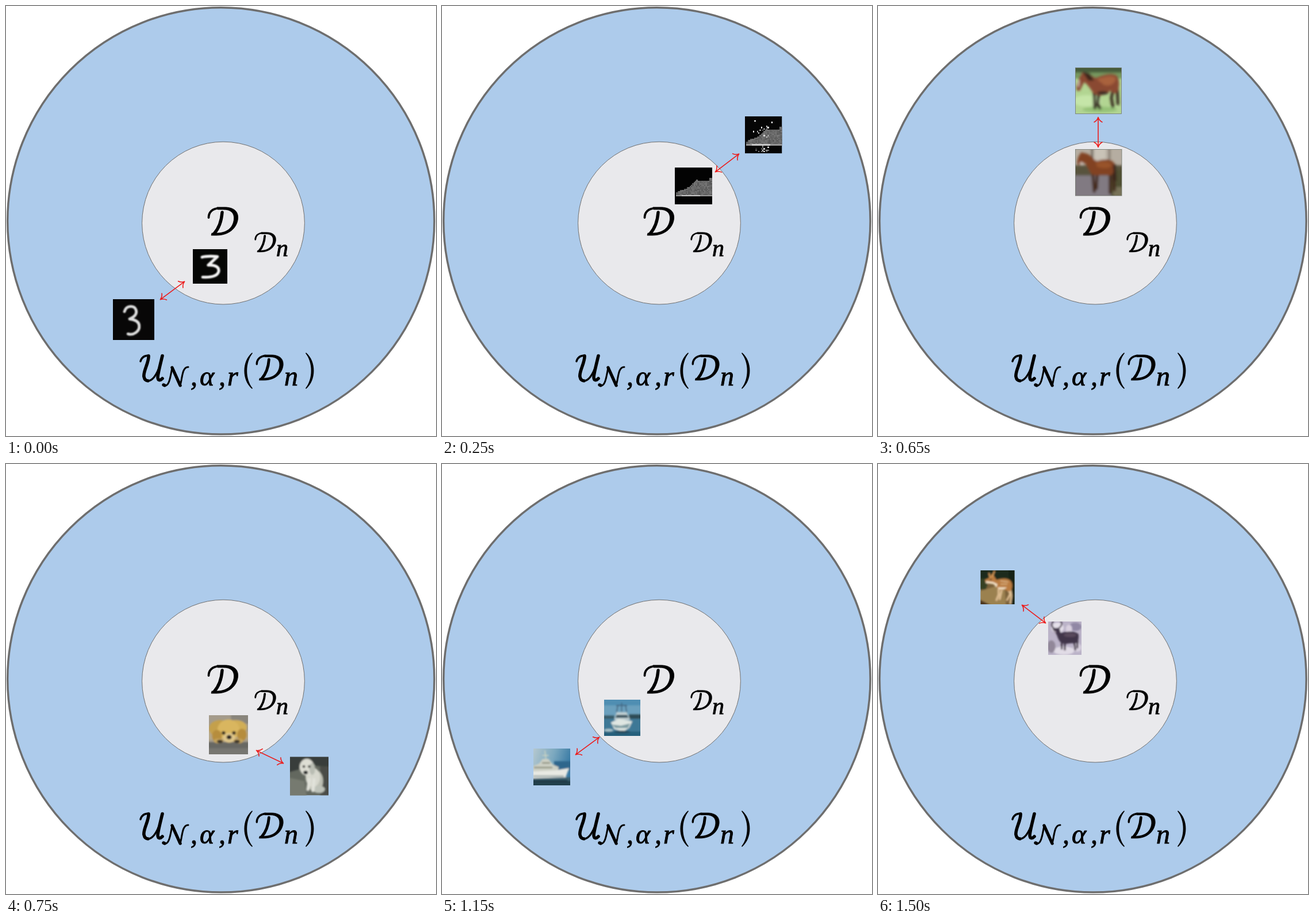
An HTML page that plays this animation: 748 by 748 pixels, repeating every 1750 ms.

```html
<!DOCTYPE html>
<html lang="en">
<head>
<meta charset="utf-8">
<title>Nested neighbourhoods</title>
<style>
  html, body { margin: 0; width: 100%; height: 100%; overflow: hidden; background: #fff; }
  svg { display: block; }
  .ink { fill: none; stroke: #000; stroke-linecap: round; stroke-linejoin: round; }
  text { font: italic 48px "Liberation Serif", "Noto Serif", serif; stroke: #000; stroke-width: .9; }
</style>
</head>
<body>
<svg id="stage" width="748" height="748" viewBox="0 0 748 748">
  <defs>
    <filter id="soft" x="-20%" y="-20%" width="140%" height="140%"><feGaussianBlur stdDeviation=".85"/></filter>
    <filter id="pen" x="-20%" y="-20%" width="140%" height="140%"><feGaussianBlur stdDeviation=".4"/></filter>
    <linearGradient id="sea" x2="1" y2=".3"><stop stop-color="#b5c8cf"/><stop offset=".55" stop-color="#7ba8bf"/><stop offset="1" stop-color="#3a7ba5"/></linearGradient>
    <g id="scriptD">
      <path stroke="#000" stroke-width=".8" d="M17 1H30C48 1 54.5 10 53.5 21C51.5 38 37 50 16 50H7L8 46H16C34 46 45 37 46.5 22C47.5 11 41 5 28 5H18Z"/>
      <path class="ink" stroke-width="3.8" d="M2.5 19C2.5 10 9 3 20 2.8"/>
      <path class="ink" stroke-width="5.4" d="M26 10C25 24 20 38 12 47"/>
    </g>
  </defs>
  <circle cx="373.9" cy="373.9" r="371.2" fill="#adcbeb" stroke="#6e6e6e" stroke-width="3.5"/>
  <circle cx="378" cy="377.6" r="141.4" fill="#e9e9ec" stroke="#707070"/>

  <use href="#scriptD" x="350" y="349"/>
  <use href="#scriptD" transform="translate(432 393) scale(.7)"/>
  <text x="470" y="435" style="font-size:42px">n</text>

  <g class="ink">
    <g transform="translate(232 605)">
      <path stroke-width="3.4" d="M2 13C4 6 9 3 16 3M40 3C38 18 28 47 15 47"/>
      <path stroke-width="5.6" d="M16 3.5C17 15 6 31 8 40C9 45 11 47 15 47M40 3.5C37 16 33 31 32 40C32 47 36 47 40 43"/>
    </g>
    <g transform="translate(272 625)">
      <path stroke-width="3" d="M2 35C12 39 14 20 17 4M31 35C35 22 34 3 45 3"/>
      <path stroke-width="5.4" d="M17 4L31 35M2 34L4 35"/>
    </g>
  </g>
  <text x="321" y="660">,</text>
  <text x="337" y="660">α</text>
  <text x="370" y="660">,</text>
  <text x="385" y="660">r</text>
  <path d="M428 603C410 618 410 651 428 666L429 665C416 649 416 620 429 604Z"/>
  <use href="#scriptD" transform="translate(434 606) scale(.9)"/>
  <text x="484" y="660">n</text>
  <path d="M522 603C540 618 540 651 522 666L521 665C534 649 534 620 521 604Z"/>
  <g id="scenes"></g>
</svg>
<script>
const STEP = 250;

const fill = (color, d) => `<path fill="${color}" d="${d}"/>`;
const line = (color, width, d) =>
  `<path fill="none" stroke="${color}" stroke-width="${width}" stroke-linecap="round" stroke-linejoin="round" d="${d}"/>`;
const oval = (color, x, y, rx, ry = rx) => `<ellipse fill="${color}" cx="${x}" cy="${y}" rx="${rx}" ry="${ry}"/>`;
const box = (color, x, y, w, h) => `<rect fill="${color}" x="${x}" y="${y}" width="${w}" height="${h}"/>`;

function thumb(x, y, w, h, units, back, art, filter = "soft") {
  return `<svg x="${x}" y="${y}" width="${w}" height="${h}" viewBox="0 0 ${units} ${units}" preserveAspectRatio="none">
    ${box(back, 0, 0, units, units)}<g ${filter && `filter="url(#${filter})"`}>${art}</g></svg>`;
}
const photo = (x, y, size, back, ...art) => thumb(x, y, size, size, 32, back, art.join(""));

function arrow(x1, y1, x2, y2) {
  const len = Math.hypot(x2 - x1, y2 - y1);
  const angle = Math.atan2(y2 - y1, x2 - x1) * 180 / Math.PI;
  const head = "M9 -7C7 -3 4 -1 .5 0C4 1 7 3 9 7";
  return `<g transform="translate(${x1} ${y1}) rotate(${angle})">${line("#ec1c1c", 1.6, `M1 0H${len - 1}${head}`)}
    <g transform="translate(${len}) scale(-1 1)">${line("#ec1c1c", 1.6, head)}</g></g>`;
}

function seeded(seed) {
  return () => (seed = seed * 16807 % 2147483647) / 2147483647;
}

// A grey boot built from 28 pixel columns, with optional bright specks.
function boot(noisy) {
  const rand = seeded(77);
  const cell = (x, y, v) => box(`rgb(${v},${v},${v})`, x, y, 1.05, 1.05);
  const top = x => x < 10 ? 19 - x * .4 : x < 17 ? 15 - (x - 10) : x < 26 ? 9.5 : 7.5;
  let art = "";
  for (let x = 1; x < 28; x++) {
    for (let y = Math.round(top(x)); y < 21; y++) art += cell(x, y, 88 + rand() * 32 | 0);
    art += cell(x, 21, x > 4 && x < 19 ? 200 : 150);
  }
  if (noisy) {
    for (let i = 0; i < 20; i++) art += cell(8 + rand() * 10 | 0, 22 + rand() * 5 | 0, 40 + rand() * 190 | 0);
    for (let i = 0; i < 14; i++) art += cell(9 + rand() * 9 | 0, 7 + rand() * 9 | 0, 50 + rand() * 180 | 0);
    for (const [x, y] of [[7, 3], [20, 4], [6, 11], [12, 8], [17, 8]]) art += cell(x, y, 245);
  }
  return `<g shape-rendering="crispEdges">${art}</g>`;
}

const border = (x, y, w) => `<rect x="${x}" y="${y}" width="${w}" height="${w}" fill="none" stroke="#70756c" stroke-width=".8"/>`;

const digits = () =>
  thumb(325, 423, 60, 60, 28, "#050604",
    line("#f5f5f5", 2.3, "M7.5 6.5C11 5.5 15 5.6 20 6L12.5 13C18 12.5 21.5 14.5 21 18C20 22 15 23 8 22.7"), "pen") +
  thumb(186, 510, 72, 71, 28, "#080707",
    line("#dedede", 1.9, "M7.8 8.5C8.5 6 10 5 12 5C16 5 16.5 9 15 11C14 12.5 12.5 13 11.3 13.6C15 14 17.7 15.5 17.8 18.5C18 22 14 25 10.2 23.8"), "pen") +
  arrow(268, 511, 311, 479);

const boots = () =>
  thumb(405, 281, 65, 64, 28, "#030303", boot(false), "") +
  thumb(527, 192, 64.5, 64.5, 28, "#060606", boot(true), "") +
  arrow(475, 289, 517, 257);

const horses = () =>
  photo(343.5, 107.5, 80, "#b2d592",
    box("#465c3b", -2, -2, 36, 5.5), box("#76985e", -2, 3.5, 36, 4), oval("#c5e5a8", 8, 23, 10, 4), oval("#94c177", 17, 29, 12, 2),
    line("#30231f", 2, "M13 18L13.5 28M16 19L15.5 26L17 28"),
    line("#35251f", 2, "M26 16L25 21L26 27M29 14L29.5 25"),
    fill("#8a4930", "M1 16L.5 13L3 6L5 3L9 4L14 7C19 5 25 3 29 5.5C31 9 31 15 28 18L24 16C21 20 14 20 12 17C10 14 8 11 6 10L3 16Z"),
    fill("#a9623e", "M15 8C20 6 26 5 28 7C28 11 24 13 20 12Z"),
    fill("#3d251f", "M5 3L10 4L13 9L9 9Z"), oval("#352820", 19, 17.5, 4, 1.2), line("#e5d5c4", .8, "M2.5 9L2 13")) +
  border(343.5, 107.5, 80) +
  photo(343.5, 249.5, 80.5, "#b5ada1",
    box("#c9c3b7", 13, -2, 8, 11), box("#635c50", 11, -2, 1.2, 14), box("#756c60", 23, -2, 1, 12),
    box("#58523c", -2, 11, 36, 8), box("#817a82", -2, 18, 30, 16), fill("#4f5031", "M24 14H34V34H25Z"), box("#777258", 26, 26, 8, 8),
    line("#45291e", 2, "M12 17L13 29M15 18L14.5 27M24 15L24 30M26 14L27 28"),
    fill("#824323", "M1 9L2 5L4 2L8 3C11 4 12 7 15 8C20 6 26 7 27 10C28 14 26 18 23 18C19 17 14 19 11 17C9 14 8 11 6 9L4 10L2 11Z"),
    fill("#98532a", "M14 9C19 8 24 8 25 11C23 14 18 13 15 12Z"), line("#38231c", 1.8, "M27 11L27.5 21"), oval("#d9c9bd", 4, 9.5, .9)) +
  border(343.5, 249.5, 80.5) +
  arrow(383, 193, 383, 246);

const dogs = () =>
  photo(353, 437, 68, "#a49b8b",
    box("#89857c", 18, -2, 16, 9), box("#b5a789", -2, 13, 36, 7), box("#686764", -2, 22, 36, 12), box("#777671", -2, 27, 36, 7),
    oval("#c4a04c", 9, 11, 9, 7), oval("#d1ae56", 22, 10, 9, 6), oval("#d9b65f", 16, 12, 9, 8.5),
    oval("#b68d3d", 6.5, 17, 4, 5), oval("#b68d3d", 27, 16, 4, 5), oval("#dfc68a", 16.5, 18.5, 5, 4),
    oval("#c5a35c", 8, 21, 4, 2), oval("#c5a35c", 24, 21, 4, 2), oval("#332a20", 12, 14.5, 1.5), oval("#332a20", 20.5, 14.5, 1.5),
    oval("#211e1c", 16.5, 18, 2.1, 1.8), oval("#3b342a", 9, 21.5, 2.4, 1.4), oval("#3b342a", 23, 21.5, 2.4, 1.4)) +
  photo(494, 509.5, 67, "#63685f",
    fill("#383d3b", "M-2 -2H34V9L20 7L-2 13Z"), fill("#767a70", "M-2 17L12 20L14 34H-2Z"), box("#484c46", 25, 8, 9, 24),
    oval("#bdbfb4", 21, 20, 6.5, 9), oval("#d7d8ce", 19, 17, 6, 8), oval("#deded4", 14, 8.5, 6, 7),
    oval("#b9bdb3", 18.5, 10, 2.4, 5), oval("#bec2b9", 24, 27, 5, 3), line("#e1e2da", 2.6, "M16 19L15 27M20 19L19 28"),
    oval("#292c2a", 11.5, 8, 1.1), oval("#3a3d3a", 16, 8, 1.1), oval("#1e2020", 13, 13, 1.9, 1.5)) +
  arrow(435, 498, 483, 521);

const boats = () =>
  photo(282, 410, 63, "#6ba0bd",
    box("#4f8eb2", -2, -2, 36, 7), box("#385a66", -2, 14, 11, 3), box("#2f4c55", 22, 13, 12, 4),
    box("#3c7896", -2, 17, 36, 17), box("#28607c", -2, 28, 36, 6),
    line("#41617b", .8, "M11 5H20M12 5L11 12M19 5L20 12M15.5 3V11"), fill("#c3d2d5", "M11 11H20L23 18H9Z"),
    fill("#35505b", "M11 13.5H20.5L21.5 16H10Z"), fill("#dfe6e2", "M6 20L13 17L25 19L22 25L17 28L9 26Z"),
    fill("#7d9ca2", "M7 22L15 23L23 21L21 25L10 25Z"), oval("#a9c4cb", 4, 27, 4, 1.2), oval("#25495a", 16, 28.5, 7, 1.2)) +
  photo(159, 495, 64, "url(#sea)",
    box("#2f668c", 18, 11, 16, 8), box("#3b6071", -2, 25, 36, 9), box("#213f4b", -2, 28, 36, 6),
    line("#d2d8c4", .8, "M10 2L11 10M8 6H13"), fill("#cdd0c5", "M-2 16L5 13L8 9H13L17 14L22 16L21 21H-2Z"),
    line("#8b8f7e", 1.2, "M1 16.5H16M8 12.5H14"), fill("#e8e9e3", "M-2 20L19 19L31 17L28 25L-2 26Z"),
    line("#9ba8a7", 1.2, "M0 24H26"), line("#1b3843", 1.4, "M-1 28H29")) +
  arrow(232, 506, 274, 475);

const cars = () =>
  photo(405, 274, 64, "#4b534f",
    fill("#34443a", "M-2 -2H34V7H-2Z"), box("#717a72", -2, 7, 10, 4), fill("#444a4b", "M-2 22L14 21L34 24V34H-2Z"),
    oval("#1c2226", 17, 27, 13, 3), fill("#c85a27", "M1 17L8 11L12 4L25 2L29 6L32 13L31 21L22 28L14 26L3 22Z"),
    fill("#d9cfc6", "M14 2.5L23 .5L28 4L24 5L15 4Z"), fill("#191d23", "M12 4L24 4.5L21 12L8 10.5Z"), fill("#30282a", "M25 6L28 6L30 11L24 13Z"),
    fill("#e67b3a", "M3 15.5L8 11.5L20 13L16 17Z"), line("#221d1e", 2, "M5 16L13 18.5"), line("#55271d", 2, "M4 20.5L14 24"),
    oval("#efcfa8", 3, 16.5, 1.5, 1), oval("#edc69c", 17.5, 18.5, 2, 1), oval("#1c1f22", 22, 25, 2.8, 3.8), oval("#a9a9a5", 22, 25, 1.2, 2),
    oval("#1c1f22", 30.5, 19, 1.4, 2.8), line("#ddd5ce", 1.2, "M7 21L10 22")) +
  photo(465.5, 150.5, 64, "#303840",
    fill("#7d909e", "M-2 1H13V9L-2 13Z"), fill("#5a342c", "M20 -2H34V9H24Z"), box("#20272e", 13, -2, 8, 6),
    line("#2c3742", 2, "M1 5H11"), box("#1f252b", -2, 26, 36, 8), box("#60463f", -2, 28, 9, 4),
    fill("#687a8a", "M2 17L8 11L14 5L25 4L29 9L31 16L29 25L18 29L7 28L3 24Z"), fill("#1f2d38", "M13 5.5L25 5L23 12L9 11.5Z"), fill("#2a353f", "M25 5L28 9L30 14L25 14Z"),
    fill("#9aabb8", "M4 16L10 12L23 13L19 18Z"), line("#192128", 2, "M6 19.5L15 20.5"), line("#27313a", 2.2, "M6 25L18 26.5"),
    oval("#cdd4d7", 4, 18.5, 1.5, 1), oval("#cbd4d9", 19, 19.5, 2.2, 1.1), oval("#13191e", 26, 24, 2.4, 3.8), line("#a8b4bd", 1, "M8 22.8H17")) +
  arrow(453, 266, 477, 220);

const deer = () =>
  photo(178.5, 185, 59, "#7a6039",
    box("#1d2b1c", -2, -2, 36, 12), fill("#344024", "M-2 8H8L5 18H-2Z"), fill("#152114", "M26 -2H34V34H29Z"),
    fill("#9b8150", "M-2 20L14 15L23 19L24 34H-2Z"), fill("#4c351d", "M-2 27L12 34H-2Z"),
    line("#e0bf93", 1.8, "M17 18L17 23L15 28M20 18L18 27M25 17L28 22L25 28M28 17L29 24L28 31"),
    fill("#ba7c40", "M4 9L8 7L11 3L13 6L15 9C20 7 27 7 29 11C31 15 29 20 27 20L22 18C18 20 15 17 14 14L10 12L5 12Z"),
    fill("#f0dec2", "M5 10L12 11L16 13L15 16L12 13L5 12ZM16 16L25 16L22 18L17 18Z"), line("#d49858", 1.3, "M11 6L13 1M9 7L8 3"),
    line("#eed6ae", .6, "M19 10L26 11M19 13L25 13"), oval("#24190f", 9.5, 8.5, .7)) +
  photo(296, 274, 58, "#bbb3c8",
    oval("#e5e0ea", 9, 6, 6, 5), oval("#e1dce6", 15, 28, 10, 4), oval("#9188a5", 26, 5, 6, 4), oval("#918799", 3, 24, 4, 6),
    oval("#d8d1df", 28, 25, 4, 4), oval("#d9d0df", 20, 7, 3, 4),
    line("#463b4b", 1.3, "M6 7C3 5 3 2 5 0M9 7C13 5 14 2 12 0"), line("#423746", 1.7, "M13 20L13 26M16 20L16 27M25 19L26 27M28 17L28 25"),
    fill("#40364a", "M4 7L8 6L11 7L12 11C18 9 26 9 29 12C30 17 28 21 25 21C20 20 16 23 12 20C9 17 9 13 7 11Z"),
    oval("#594a5b", 21, 13, 6, 2), oval("#a79ba9", 6.5, 10, 1)) +
  arrow(250, 245, 292, 277);

const scenes = document.getElementById("scenes");
scenes.innerHTML = [digits, boots, horses, dogs, boats, cars, deer].map(draw => `<g>${draw()}</g>`).join("");
const groups = [...scenes.children];

function tick() {
  const active = Math.floor(performance.now() / STEP) % groups.length;
  groups.forEach((g, i) => { g.style.display = i === active ? "" : "none"; });
  requestAnimationFrame(tick);
}
tick();
</script>
</body>
</html>
```
